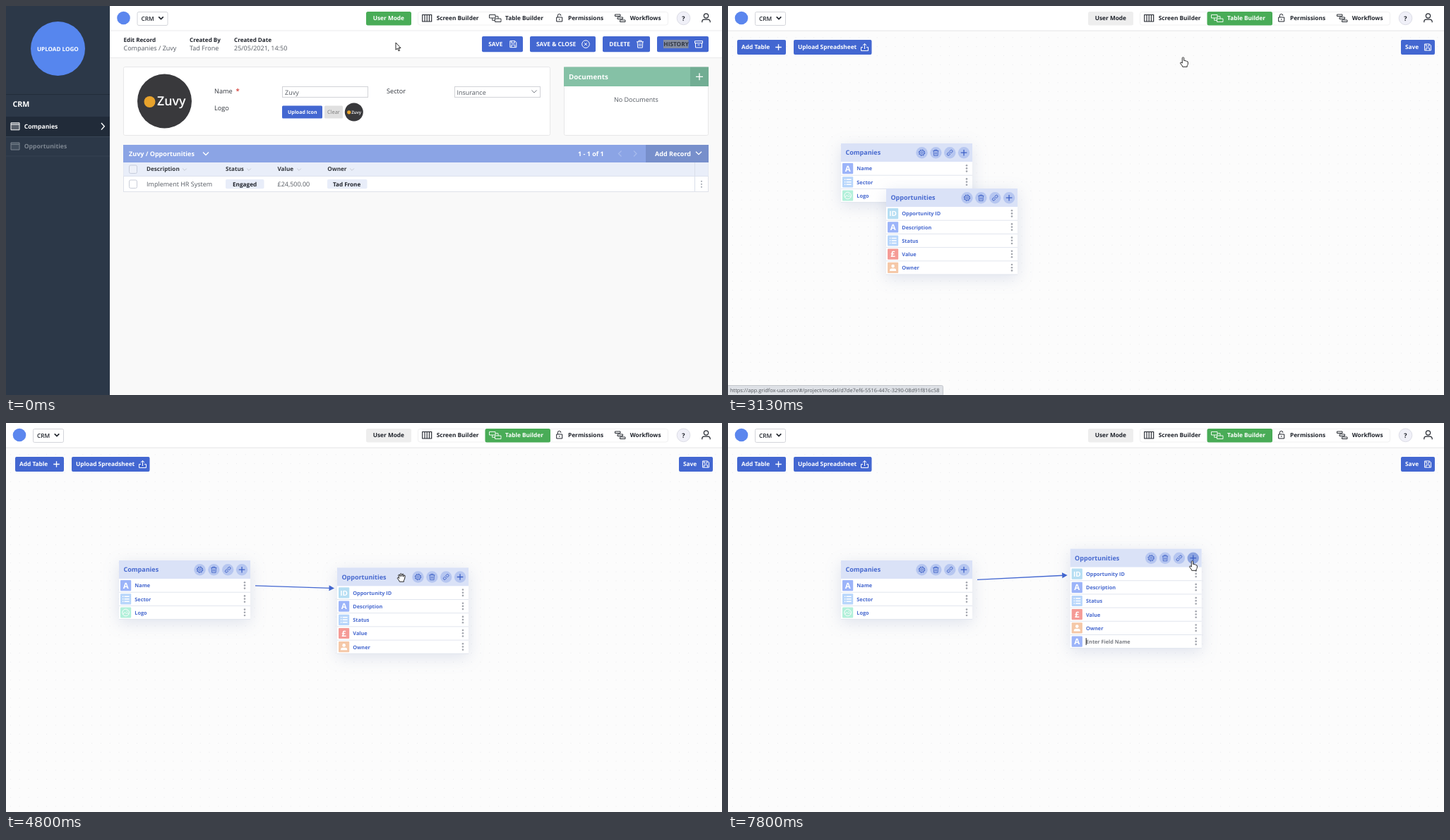
Write an HTML page that moves like this. It is 1014x552 px and loops after 8000 ms.

```html
<!DOCTYPE html>
<html lang="en">
<head>
<meta charset="utf-8">
<title>Table builder</title>
<style>
  html, body { margin: 0; width: 100%; height: 100%; overflow: hidden; background: #fcfcfc; }
  svg { display: block; width: 100vw; height: 100vh; }
  text { font-family: "Open Sans", "Noto Sans", sans-serif; text-rendering: geometricPrecision; white-space: pre; }
  .shadow { filter: drop-shadow(0 5px 11px rgba(80, 100, 160, .17)); }
</style>
</head>
<body>
<svg id="stage" viewBox="0 0 1014 552"></svg>
<script>
const BLUE = '#4367d1', INK = '#20242c', GREEN = '#49ac57', GREY = '#555a62';
const COMPANY = 'Zuvy', PERSON = 'Tad Frone';

// Markup helpers; text is placed by its vertical centre.
const rect = (x, y, w, h, fill, more = '') =>
  `<rect x="${x}" y="${y}" width="${w}" height="${h}" fill="${fill}" ${more}/>`;
const box = (x, y, w, h, fill, line, r = 0) => rect(x + .5, y + .5, w - 1, h - 1, fill, `stroke="${line}" rx="${r}"`);
const disc = (x, y, r, fill, more = '') => `<circle cx="${x}" cy="${y}" r="${r}" fill="${fill}" ${more}/>`;
const line = (d, color, w = 1, more = '') =>
  `<path d="${d}" fill="none" stroke="${color}" stroke-width="${w}" ${more}/>`;
const text = (x, y, s, size, fill, weight = 700, more = '') =>
  `<text x="${x}" y="${y + size * .36}" font-size="${size}" font-weight="${weight}" fill="${fill}" ${more}>${s}</text>`;
const group = (x, y, body, more = '') => `<g transform="translate(${x} ${y})" ${more}>${body}</g>`;
const chevron = (x, y, w, color, sw = 1.3) => line(`M${x - w} ${y - w / 2}l${w} ${w} ${w} ${-w}`, color, sw);
const plus = (x, y, r, color, w = 1.2) => line(`M${x - r} ${y}h${2 * r}M${x} ${y - r}v${2 * r}`, color, w);
const kebab = (x, y, gap, r, color) => [-gap, 0, gap].map(d => disc(x, y + d, r, color)).join('');

// Icons are drawn around their own centre.
const icons = {
  save: c => line('M-4.5 -4.5H2.5L4.5 -2.5V4.5H-4.5ZM-2.5 -4.5V-1.5H2V-4.5M-2.5 4.5V1H2.5V4.5', c),
  close: c => disc(0, 0, 5.3, 'none', `stroke="${c}"`) + line('M-2 -2L2 2M2 -2L-2 2', c),
  trash: c => line('M-5 -3.3H5M-2 -3.3V-5H2V-3.3M-3.8 -3.3L-3.3 5H3.3L3.8 -3.3M-1.2 -1V3M1.2 -1V3', c),
  archive: c => line('M-5.5 -4.5H5.5V-1.5H-5.5ZM-4.5 -1.5V4.8H4.5V-1.5M-1.5 1H1.5', c),
  upload: c => line('M0 2.5V-5M-2.6 -2.5L0 -5L2.6 -2.5M-2.5 0H-5V5H5V0H2.5', c),
  plus: c => plus(0, 0, 4.3, c, 1.3),
  gear: c => disc(0, 0, 3.5, 'none', `stroke="${c}" stroke-width=".9"`) + disc(0, 0, 1.4, 'none', `stroke="${c}" stroke-width=".8"`) +
    disc(0, 0, 4.3, 'none', `stroke="${c}" stroke-width="1" stroke-dasharray="1.6 1.78"`),
  bin: c => group(0, 0, `<g transform="scale(.82)">${icons.trash(c)}</g>`),
  link: c => `<g transform="rotate(-45)">${line('M-.5 -1.7H-3A1.7 1.7 0 0 0 -3 1.7H-.5M.5 -1.7H3A1.7 1.7 0 0 1 3 1.7H.5M-2 0H2', c, .9)}</g>`
};
const icon = (name, x, y, c) => group(x, y, icons[name](c));

const button = (x, y, w, h, label, tx, name, ix) =>
  rect(x, y, w, h, BLUE, 'rx="2"') + text(tx, y + h / 2, label, 8.3, '#fff') + icon(name, ix, y + h / 2, '#fff');

const tableIcon = c => line('M684.5 12.5h8.5v4.5h-8.5zM692.5 18h8.5v4.5h-8.5zM688.7 17v3.3h3.8M693 14.7h4v3.3', c, .9);

// Bar across the top, shared by both screens.
function topBar(x, builder) {
  const tab = builder ? '#fff' : INK;
  return rect(x, 0, 1014 - x, 35, '#fff') + rect(x, 34.6, 1014 - x, 1, '#e4e4e6') +
    disc(x + 19, 17, 9.3, '#5b86ee') +
    box(x + 38, 8, 44, 20, '#fff', '#d3d5da', 2) + text(x + 44, 17.6, 'CRM', 8.3, INK, 600) + chevron(x + 72, 17, 3.3, INK, 1.6) +
    rect(510, 8, 64, 19.4, builder ? '#eeeeee' : GREEN, 'rx="2.5"') +
    text(519.7, 17.3, 'User Mode', 8.3, builder ? INK : '#fff') +
    box(583, 8, 355, 19.5, '#fff', '#f0f0f1', 3) +
    (builder ? rect(678.5, 8, 92.5, 19.4, GREEN, 'rx="2.5"') : rect(678.5, 8, 92.5, 19.4, '#ececec', 'rx="2" id="hover"')) +
    line('M589.7 12.5h13v9.5h-13zM593 12.5v9.5M596.2 12.5v9.5M599.4 12.5v9.5', INK, 1.1) +
    text(609.7, 17.3, 'Screen Builder', 8.3, INK) +
    tableIcon(tab) + text(707, 17.3, 'Table Builder', 8.3, tab) +
    line('M779.7 16h8v6h-8zM781.3 16v-2.3a2.3 2.3 0 0 1 4.6 0', INK) + disc(783.7, 19, .8, INK) +
    text(796, 17.3, 'Permissions', 8.3, INK) +
    line('M862.5 12h7.5v2.5h-7.5zM866 16h7.5v2.5h-7.5zM869.5 20h7.5v2.5h-7.5z', INK, .95) +
    text(883.7, 17.3, 'Workflows', 8.3, INK) +
    disc(959.5, 17.3, 9.3, '#f0f0f8', 'stroke="#dcdde6"') + text(957.2, 17.3, '?', 9, INK) +
    disc(991.5, 14, 3.1, 'none', `stroke="${INK}" stroke-width="1.2"`) +
    line('M985.8 23.3v-1.2a3 3 0 0 1 3 -3h5.4a3 3 0 0 1 3 3v1.2', INK, 1.2);
}

const sideItem = (y, label, c) =>
  rect(7, y - 5, 12, 10, c, 'opacity=".25"') + line(`M7 ${y - 5}h12v10h-12zM7 ${y - 2.7}h12`, c) + text(25.7, y, label, 8.65, c);

const badge = (x, y, r, k) => disc(x, y, r, '#39393c') + disc(x - 21 * k, y + k, 8 * k, '#e8a32c') +
  text(x - 10.5 * k, y, COMPANY, 17.8 * k, '#fff', 600);

const sideBar = rect(0, 0, 147, 552, '#2c3848') + rect(0, 125, 147, 1, '#222c3a') +
  disc(73.5, 60.5, 38.5, '#5686ee') + text(43.9, 61.3, 'UPLOAD LOGO', 8.15, '#fff') +
  text(9.5, 139.5, 'CRM', 10.7, '#fff') +
  rect(0, 157, 147, 28, '#212b39') + sideItem(170.8, 'Companies', '#fff') + line('M135 166l4.3 4.8 -4.3 4.8', '#fff', 1.4) +
  rect(0, 185, 147, 1, '#394555') + sideItem(199, 'Opportunities', '#7e8792') + rect(0, 212.5, 147, 1, '#364252');

const facts = [[166.5, 'Edit Record', 'Companies / ' + COMPANY], [260, 'Created By', PERSON], [323, 'Created Date', '25/05/2021, 14:50']]
  .map(([x, a, b]) => text(x, 48, a, 8.1, INK) + text(x, 59.3, b, 9, GREY, 400)).join('');

const form = box(166, 86, 605, 98, '#fff', '#e7e7e8', 2) + badge(224.5, 135, 38.5, 1) +
  text(295, 120.3, 'Name', 9.2, '#33373e', 400) + text(325.5, 120.5, '*', 9.5, '#d8504a') +
  text(295, 144.8, 'Logo', 9.2, '#33373e', 400) + text(539, 120.3, 'Sector', 9.2, '#33373e', 400) +
  box(391, 114, 122, 16, '#fff', '#d2d3d7') + text(395, 122.3, COMPANY, 9, GREY, 400) +
  box(635, 114, 122, 16, '#fff', '#d2d3d7') + text(638.5, 122.3, 'Insurance', 9, GREY, 400) + chevron(748, 121.3, 3.6, '#777b84', 1) +
  rect(391, 141.5, 57, 18, BLUE, 'rx="1.5"') + text(399, 150.7, 'Upload Icon', 7, '#fff') +
  rect(451, 141.5, 26, 18, '#e0e0e0', 'rx="1.5"') + text(455, 150.7, 'Clear', 7.4, '#7b7b7b', 400) +
  badge(492.8, 150.5, 13, .335);

const docs = box(790, 86, 205, 98, '#fff', '#e7e7e8', 2) + rect(790, 86.5, 179, 27.5, '#85c1a6') + rect(969, 86.5, 26, 27.5, '#71ad93') +
  text(797, 100.3, 'Documents', 9.8, '#fff') + plus(982, 100.3, 5, '#fff', 1.3) + text(861, 133, 'No Documents', 9, GREY, 400);

const columns = [[199, 'Description', 253], [311, 'Status', 344], [384.5, 'Value', 415], [455.3, 'Owner', 490]]
  .map(([x, s, cx]) => text(x, 231.5, s, 8.15, '#33373e') + chevron(cx, 232, 2.8, '#c0c4ce', .9)).join('');

const grid = box(166, 197, 829, 67, '#fff', '#dfe2ea') + rect(166, 197, 740, 25, '#8ba4e5') + rect(906, 197, 89, 25, '#778fcb') +
  text(174, 209.8, COMPANY + ' / Opportunities', 9, '#fff') + chevron(283, 209.5, 4, '#fff') +
  text(810, 209.6, '1 - 1 of 1', 9, '#fff') +
  line('M871.5 205.5l-4 4 4 4M889 205.5l4 4 -4 4', '#a9bcec', 1.1) +
  text(919, 209.8, 'Add Record', 9, '#fff') + chevron(981, 208.7, 4, '#fff') +
  rect(166.5, 222, 828, 19.5, '#e9eef9') + rect(166.5, 241, 828, 1, '#dde2ee') + rect(975, 222, 1, 41, '#d9deea') +
  box(174, 225.5, 12, 12.5, '#eef1f9', '#c6ccdc', 2) + box(174, 246.5, 12, 12.5, '#fff', '#c9cdd8', 2) + columns +
  text(199, 253, 'Implement HR System', 9, GREY, 400) +
  rect(311, 246, 54.5, 13.3, '#e8edf9', 'rx="2"') + text(321, 252.8, 'Engaged', 8.2, INK) +
  text(384.5, 253, '£24,500.00', 9, GREY, 400) +
  rect(455, 246, 56.5, 13.3, '#e8edf9', 'rx="2"') + text(463, 252.8, PERSON, 8.1, INK) +
  kebab(985, 252.8, 4, 1.1, '#a9adb6');

const record = rect(147, 0, 867, 552, '#f9f9f9') + topBar(147.5, false) + rect(147, 35.5, 867, 37.5, '#fff') +
  rect(147, 73, 867, 1, '#e9e9ea') + facts +
  button(674, 43, 58, 22.3, 'SAVE', 683.3, 'save', 718.3) +
  button(742, 43, 93, 22.3, 'SAVE &amp; CLOSE', 751, 'close', 821) +
  button(845, 43, 67, 22.3, 'DELETE', 854.3, 'trash', 898) +
  button(922, 43, 73, 22.3, 'HISTORY', 931.3, 'archive', 981) +
  `<g id="marked">${rect(931, 48, 35.5, 12, '#858da0')}${text(931.3, 54.15, 'HISTORY', 8.3, '#2f3644')}</g>` +
  form + docs + grid + sideBar;

// Table cards of the builder.
const ROW = 19.2;
const glyph = s => text(0, 0, s, s === 'ID' ? 10 : 11.5, '#fff', 700, 'text-anchor="middle"');
const kinds = {
  text: ['#9cb4f9', glyph('A')],
  list: ['#b8d6fb', line('M-2 -3.5H5M-2 0H5M-2 3.5H5M-4.7 -3.5h1.4M-4.7 0h1.4M-4.7 3.5h1.4', '#fff', 1.4)],
  image: ['#b2f0da', disc(0, 0, 4.8, 'none', 'stroke="#fff"') + line('M-4 2.5L-1.3 -.5L.8 1.5L2.2 .2L4.3 2.3', '#fff') + disc(1.7, -2, .8, '#fff')],
  id: ['#b6def3', glyph('ID')],
  money: ['#f59b96', glyph('£')],
  user: ['#f5c8a8', disc(0, -2.3, 2.3, '#fff') + '<path d="M-4.5 4.5V3.5Q-4.5 1 -2 1H2Q4.5 1 4.5 3.5V4.5Z" fill="#fff"/>']
};
function row(i, kind, label, color = '#4769cf') {
  const y = 26 + ROW * (i + .5), [fill, art] = kinds[kind];
  return rect(0, y + ROW / 2 - .5, 186, 1, '#e1e5ee') + rect(2, y - 7.6, 15.2, 15.2, fill, 'rx="1"') + group(9.6, y, art) +
    text(22.3, y + .2, label, 7.3, color) + kebab(178, y - .2, 4.2, 1.3, '#a3a6ae');
}
const card = (id, title, rows) =>
  rect(0, 0, 186, 26 + ROW * rows.length, '#fff', `class="shadow" id="${id}Body"`) + rect(0, 0, 186, 26, '#dae2f7') +
  text(6.4, 13.2, title, 9, '#4769cf') +
  ['gear', 'bin', 'link', 'plus'].map((n, i) => disc(114.5 + 19.85 * i, 13.2, 8.2, '#b6c6f0', `id="${id}${n}"`) +
    icon(n, 114.5 + 19.85 * i, 13.2, '#3d60c6')).join('') +
  rows.map((r, i) => row(i, ...r)).join('');

const builder = rect(0, 0, 1014, 552, '#fcfcfc') + rect(0, 36, 1014, 516, 'url(#dots)') + topBar(0, true) +
  button(13, 48, 69, 21, 'Add Table', 19, 'plus', 71.5) +
  button(93, 48, 110.5, 21, 'Upload Spreadsheet', 99, 'upload', 193.5) +
  button(953, 48, 48, 21, 'Save', 959, 'save', 991) +
  group(160, 195, card('co', 'Companies', [['text', 'Name'], ['list', 'Sector'], ['image', 'Logo']])) +
  `<g id="arrow">${line('', BLUE, 1.4, 'id="shaft"')}<path id="head" d="M0 0L-7.5 -4V4Z" fill="${BLUE}"/></g>` +
  `<g id="op">${card('op', 'Opportunities', [['id', 'Opportunity ID'], ['text', 'Description'], ['list', 'Status'], ['money', 'Value'], ['user', 'Owner']])}` +
  `<g id="extra">${row(5, 'text', 'Enter Field Name', '#7b7e85')}${rect(22, 126.6, 1, 10, '#222', 'id="caret"')}</g></g>`;

const url = 'https://app.gridfox-uat.com/#/project/model/d7de7ef6-5516-447c-3290-08d91f816c58';
const status = `<g id="status">${rect(-1, 538.5, 305.5, 15, '#dee1e6', 'stroke="#c3c6cb" rx="2"')}${text(3, 545.7, url, 7.38, '#50545a', 400)}</g>`;

const pen = 'fill="#fff" stroke="#111" stroke-width=".9" stroke-linejoin="round"';
const cursors = `<g id="cursor">
  <path id="pointer" ${pen} d="M0 0V10.2L2.4 8.1L4 11.8L5.6 11.1L4 7.5H7Z"/>
  <path id="hand" ${pen} d="M-1.2 1Q0 -.6 1.2 1V5Q2.6 4.2 3.4 5.5Q4.7 4.8 5.3 6.1Q6.9 5.8 6.9 7.6V9.7Q6.7 11 5.7 12.2V13.8H-.7Q-1.2 11.8 -3.6 9.3Q-4.4 7.4 -2.7 7.4L-1.2 8.5Z"/>
  <path id="grab" ${pen} d="M-2.6 6.2Q-3.2 4.2 -5.6 1.6Q-6 .2 -4.4 .4L-3.2 1.4L-4.3 -3Q-3.8 -4.6 -2.5 -3.4L-1.6 -1.2L-1.8 -4.6Q-.8 -6.4 .2 -4.8L.6 -1.4L1.2 -4.4Q2.4 -5.6 3 -4L2.7 -1L3.8 -2.8Q5.2 -3.3 5.2 -1.8Q4.9 2.6 3.4 4.6V6.2Z"/>
</g>`;

const stage = document.getElementById('stage');
stage.innerHTML = `<defs><pattern id="dots" width="12.8" height="12.8" patternUnits="userSpaceOnUse">${disc(6.4, 6.4, .6, '#e7e7e9')}</pattern></defs>
  <g id="record">${record}</g><g id="builder">${builder}</g>${status}${cursors}`;
const $ = id => document.getElementById(id);

// Rows of [time, x, y, eased]; the ease shapes the way to that row.
const cursorPath = [
  [267, 552, 52], [1133, 698, 28, 1], [1333, 704.5, 22.5], [3067, 704.5, 22.5], [3133, 644.5, 72.5],
  [3600, 311, 272, 1], [3933, 311, 272], [4200, 396, 300], [4467, 470, 274], [4800, 560, 219],
  [5067, 571, 192], [5600, 571, 192], [5667, 582, 203], [5867, 612, 215], [6133, 653, 202], [6267, 657.5, 195.5]
];
const cardPath = [
  [3933, 224, 259], [4200, 288, 278], [4467, 374, 261], [4800, 469, 205.3], [5067, 484.7, 178.5]
];
function along(path, t) {
  const i = path.findIndex(p => p[0] >= t);
  if (i < 1) return (i ? path[path.length - 1] : path[0]).slice(1, 3);
  const [a, b] = [path[i - 1], path[i]];
  let k = (t - a[0]) / (b[0] - a[0]);
  if (b[3]) k = (1 - Math.cos(Math.PI * k)) / 2;
  return [a[1] + (b[1] - a[1]) * k, a[2] + (b[2] - a[2]) * k];
}
const ramp = (t, a, b) => Math.min(1, Math.max(0, (t - a) / (b - a)));
const show = (id, on) => $(id).setAttribute('display', on ? 'inline' : 'none');
const move = (id, x, y, more = '') => $(id).setAttribute('transform', `translate(${x} ${y}) ${more}`);

function draw(t) {
  const built = t >= 2330;
  show('record', !built);
  show('builder', built);
  show('marked', t < 2195);
  $('hover').setAttribute('opacity', ramp(t, 1133, 1400));
  $('status').setAttribute('opacity', Math.min(ramp(t, 1200, 1530), 1 - ramp(t, 3133, 3400)));

  const kind = t < 1195 ? 'pointer' : t < 3195 ? 'hand' : t < 3530 ? 'pointer' : t < 6065 ? 'grab' : 'hand';
  ['pointer', 'hand', 'grab'].forEach(k => show(k, k === kind));
  move('cursor', ...along(cursorPath, t));

  const [x, y] = along(cardPath, t), added = t >= 6730;
  move('op', x, y);
  show('extra', added);
  show('caret', t < 7330 || t >= 7795);
  $('opBody').setAttribute('height', 26 + ROW * (added ? 6 : 5));
  $('opplus').setAttribute('fill', t >= 6130 ? '#8ba3e0' : '#b6c6f0');

  // The link runs between the cards on the line joining their anchors.
  show('arrow', x > 366);
  const slope = (y - 195) / (x - 160), at = px => 227.5 + slope * (px - 253), tip = x - 4;
  $('shaft').setAttribute('d', `M353 ${at(353)}L${tip - 5} ${at(tip - 5)}`);
  move('head', tip, at(tip), `rotate(${Math.atan(slope) * 180 / Math.PI})`);
}

const STEP = 1000 / 15, start = performance.now();
function tick() {
  const t = (performance.now() - start) % 8000;
  draw(Math.floor((t + 4) / STEP) * STEP);
  requestAnimationFrame(tick);
}
tick();
</script>
</body>
</html>
```
